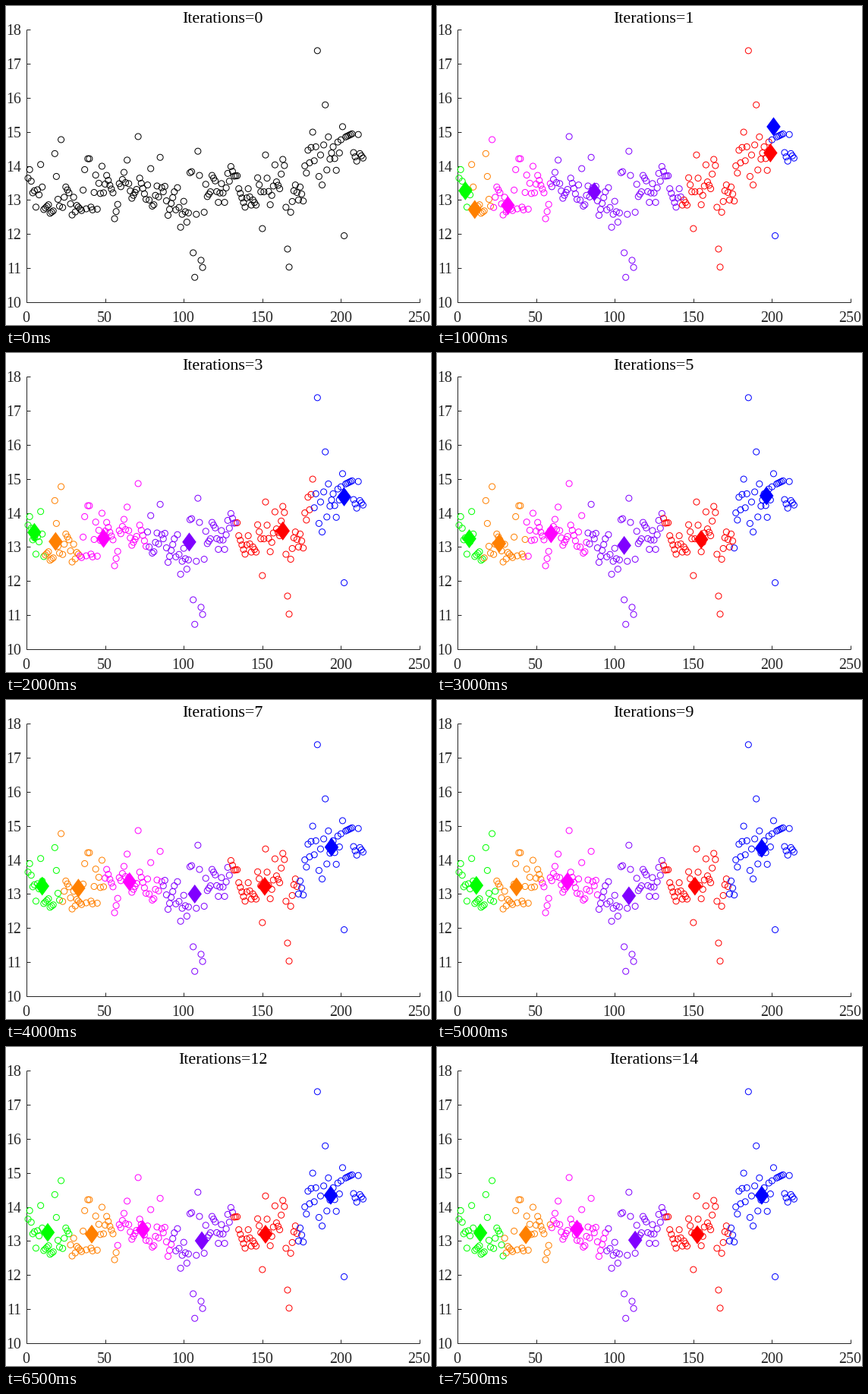
A matplotlib script that plays this animation: 560 by 420 pixels, repeating every 8 s.

```python
import matplotlib.pyplot as plt
import numpy as np
from matplotlib.animation import FuncAnimation

W, H, DPI = 560, 420, 100
PT = 72 / DPI                     # points per pixel
LEFT, RIGHT, TOP, BOTTOM = 27, 545, 31, 390
INK = "#262626"
COLORS = np.array([(0, 1, 0), (1, .5, 0), (1, 0, 1),
                   (.5, 0, 1), (1, 0, 0), (0, 0, 1)])
SEEDS = [5, 11, 32, 87, 199, 201]
TIES_UP = [17, 143, 173, 174, 200]  # equidistant samples that join the right cluster
STEPS = 14

# Main readings; the gaps are filled along straight lines.
NA = np.nan
y = np.array([
    13.64, 13.89, NA, 13.21, 13.27, 12.79, 13.30, 13.15, 14.04, NA,
    12.72, NA, NA, 12.86, 12.61, NA, 12.68, 14.36, NA, 13.02,
    12.82, 14.77, 12.78, NA, 13.38, NA, 13.21, NA, 12.56, 13.08,
    12.65, 12.84, NA, NA, 12.69, NA, 13.89, 12.74, 14.21, 14.21,
    12.79, 12.71, NA, 13.73, 12.73, 13.49, 13.19, 13.99, 13.21, NA,
    13.72, NA, 13.43, NA, 13.21, 12.45, NA, 12.87, 13.48, 13.39,
    NA, 13.81, 13.51, 14.17, 13.48, NA, 13.05, NA, NA, 13.31,
    14.86, 13.64, NA, 13.34, NA, 13.02, 13.44, 13.00, 13.92, 12.82,
    12.86, NA, 13.41, 13.09, 14.25, 13.36, 13.24, 13.40, NA, 12.55,
    NA, 12.90, NA, 13.24, 12.71, 13.36, NA, 12.20, NA, 12.96,
    NA, 12.35, 12.62, 13.80, 13.83, 11.45, 10.73, NA, 14.43, 13.72,
    11.23, 11.02, 12.64, 13.46, 13.10, NA, 13.24, 13.72, NA, 13.56,
    NA, 12.93, NA, 13.48, NA, 12.93, NA, 13.78, 13.55, 13.98,
    NA, 13.70, NA, 13.71, 13.33, NA, NA, NA, 12.79, NA,
    13.33, NA, 12.85, 13.00, NA, 12.85, 13.65, NA, 13.24, 12.16,
    NA, 14.32, 13.64, NA, 12.86, NA, 13.41, 14.03, 13.53, NA,
    13.33, NA, 14.19, 14.01, NA, 11.56, 11.03, 12.64, NA, 13.27,
    13.44, NA, 13.00, 13.38, NA, 12.97, 14.00, 13.79, 14.46, 14.09,
    NA, 14.99, 14.15, 14.56, 17.38, 13.69, 14.32, 13.44, NA, 15.79,
    13.88, 14.85, 14.20, NA, 14.56, NA, 13.87, 14.70, 14.38, NA,
    15.15, 11.95, 14.85, NA, NA, NA, 14.94, 14.39, NA, 14.14,
    14.92, 14.36, NA, 14.23])
x = np.arange(1, len(y) + 1)
known = ~np.isnan(y)
y = np.interp(x, x[known], y[known])


def px(v):
    return LEFT + np.asarray(v) * (RIGHT - LEFT) / 250


def py(v):
    return BOTTOM - (np.asarray(v) - 10) * (BOTTOM - TOP) / 8


def cluster(steps):
    """Return (centres, labels) for every k-means iteration."""
    index = np.array(SEEDS) - 1
    centres = np.column_stack([x[index], y[index]]).astype(float)
    nudged = x + .1 * np.isin(x, TIES_UP)
    history = []
    for _ in range(steps):
        cuts = (centres[:-1, 0] + centres[1:, 0]) / 2
        labels = (nudged[:, None] > cuts).sum(axis=1)
        history.append((centres, labels))
        centres = np.array([(x[labels == k].mean(), y[labels == k].mean())
                            for k in range(len(SEEDS))])
    return history


history = cluster(STEPS)

plt.rcParams["font.family"] = "Liberation Serif"
fig = plt.figure(figsize=(W / DPI, H / DPI), dpi=DPI, facecolor="white")
ax = fig.add_axes([0, 0, 1, 1])
ax.set_xlim(0, W)
ax.set_ylim(H, 0)
ax.axis("off")


def line(xs, ys):
    ax.plot(xs, ys, color=INK, lw=PT, solid_capstyle="butt", zorder=1)


def label(tx, ty, text, size=20, color=INK, ha="center"):
    return ax.text(tx, ty, text, fontsize=size * PT, color=color,
                   ha=ha, va="baseline")


line([LEFT, RIGHT], [BOTTOM, BOTTOM])
line([LEFT, LEFT], [TOP, BOTTOM])
for v in range(0, 251, 50):
    line([px(v)] * 2, [BOTTOM, BOTTOM - 5])
    label(px(v) - .5, 416, str(v))
for v in range(10, 19):
    line([LEFT, LEFT + 5], [py(v)] * 2)
    label(20, py(v) + 7, str(v), ha="right")

title = label(285.5, 22, "", size=22, color="black")
dots = ax.scatter(px(x), py(y), s=(8 * PT) ** 2, facecolors="none",
                  edgecolors="black", linewidths=PT, zorder=2)
diamond = [(0, -1), (.74, 0), (0, 1), (-.74, 0)]
marks = ax.scatter(px(SEEDS), py(SEEDS), s=(25 * PT) ** 2, marker=diamond,
                   c=COLORS, linewidths=0, zorder=3)


def draw(frame):
    step = max(0, frame - 1)
    title.set_text(f"Iterations={step}")
    marks.set_visible(step > 0)
    if step == 0:
        dots.set_edgecolors("black")
    else:
        centres, labels = history[step - 1]
        dots.set_edgecolors(COLORS[labels])
        marks.set_offsets(np.column_stack([px(centres[:, 0]), py(centres[:, 1])]))
    return dots, marks, title


anim = FuncAnimation(fig, draw, frames=STEPS + 2, interval=500,
                     repeat=True, repeat_delay=0)
plt.show()
```
